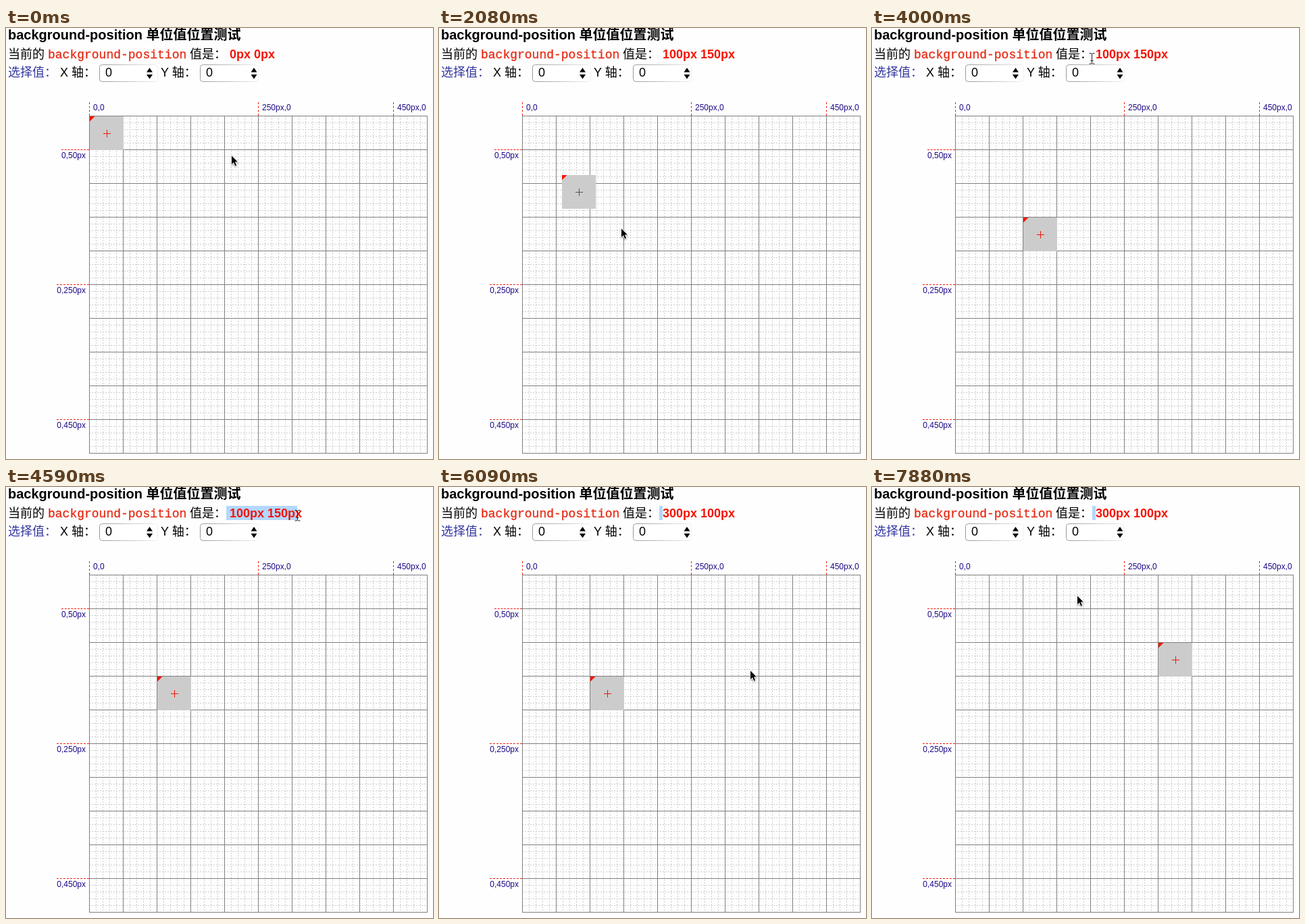
An HTML page that plays this animation: 632 by 639 pixels, repeating every 8 s.

```html
<!DOCTYPE html>
<html lang="zh-CN">
<head>
<meta charset="utf-8">
<style>
html, body { margin: 0; width: 100%; height: 100%; overflow: hidden; background: #fefefe; }
svg { display: block; width: 632px; height: 639px; }
text, .label { font: 18px 'Liberation Sans', 'Noto Sans CJK SC', 'Noto Sans CJK', sans-serif; white-space: pre; }
.title { font-size: 20px; font-weight: bold; }
.code { font-family: 'Liberation Mono', monospace; fill: #e62a14; stroke: #e62a14; stroke-width: .3px; }
.value { font-weight: bold; fill: #f51505; }
#labels { position: absolute; left: 0; top: 0; width: 632px; }
.label { position: absolute; font-size: 12px; line-height: 17px; color: #1c0a86; border: 0 dashed #f51505; }
.top { top: 110px; height: 20px; border-left-width: 1px; padding-left: 5px; }
.left { right: 509px; border-top-width: 1px; padding-right: 5px; }
</style>
</head>
<body>
<svg viewBox="0 0 632 639">
  <defs>
    <linearGradient id="edge"><stop stop-color="#999"/><stop offset="1" stop-color="#f0f0f0"/></linearGradient>
    <g id="select">
      <rect x=".5" y="54.5" width="86" height="25" rx="4" fill="#fff" stroke="url(#edge)"/>
      <text x="9" y="72">0</text>
    </g>
    <path id="spinner" d="M-4.5 65.5h9l-4.5 -6.5zM-4.5 69h9l-4.5 6.5z"/>
  </defs>

  <text class="title" x="3" y="17">background-position 单位值位置测试</text>
  <rect id="selection" x="326" y="28" height="21" fill="#b3d7ff"/>
  <text x="3" y="45">当前的</text>
  <text class="code" x="62" y="45">background-position</text>
  <text x="272" y="45">值是：</text>
  <text class="value" id="value" x="331" y="45"></text>
  <text x="3" y="72" fill="#3336a0">选择值：</text>
  <text x="80" y="72">X 轴：</text>
  <use href="#select" x="138"/>
  <use href="#spinner" x="212.5"/>
  <text x="229" y="72">Y 轴：</text>
  <use href="#select" x="287"/>
  <use href="#spinner" x="367"/>

  <path id="minor" stroke="#ccc" stroke-dasharray="2 2"/>
  <path id="major" stroke="#808080"/>

  <g id="block">
    <rect width="50" height="50" fill="#ccc"/>
    <path d="M0 0H7.5L0 7.5Z" fill="#f51505"/>
    <path id="cross" d="M20 25.5H31M25.5 20V31"/>
  </g>

  <path id="arrow" d="M1 1.5V14L4 11.3L6.2 16.5L8 15.7L5.9 10.6H9.8Z" stroke="#fff" stroke-width="1.6"
    paint-order="stroke" style="filter: drop-shadow(0 1px 1px #0006)"/>
  <path id="beam" d="M-3.5 -7.5H-1L.5 -6.5L2 -7.5H4.5M.5 -6.5V7M-3.5 8H-1L.5 7L2 8H4.5M-1.5 3.5H2.5" fill="none" stroke="#222"/>
</svg>
<div id="labels"></div>
<script>
const $ = id => document.getElementById(id);
const LOOP = 8000;
const TICK = 145;

// Each cursor move leaves from where the previous one ended; bend curves its path.
const dragSelect = { start: 4290, end: 4740, to: [438, 42] };
const moves = [
  { start: 590, end: 1630, to: [269, 296], bend: [92, 250] },
  { start: 2970, end: 4000, to: [325, 45] },
  dragSelect,
  { start: 5190, end: 5790, to: [460, 271], bend: [494, 340] },
  { start: 6240, end: 7130, to: [285, 182] },
  { start: 7280, end: 7880, to: [303, 160] }
];
const clicks = [
  { time: 2080, slide: 2080, to: [100, 150] },
  { time: 6090, slide: 6240, to: [300, 100] }
];

const mix = (a, b, p) => a.map((v, i) => v + (b[i] - v) * p);

// Eased progress that changes only once per tick.
function progress(t, { start, end }) {
  if (t < start) return 0;
  const steps = Math.round((end - start) / TICK);
  const index = Math.floor((t - start) / (end - start) * steps + 0.05);
  const p = Math.min(1, (index + 1) / (steps + 1));
  return 1 - (1 - p) ** 2;
}

function cursorAt(t) {
  let point = [333, 188];
  for (const move of moves) {
    const p = progress(t, move);
    const bend = move.bend || mix(point, move.to, 0.5);
    point = mix(mix(point, bend, p), mix(bend, move.to, p), p);
  }
  return point.map(Math.round);
}

const isSliding = (t, { slide }) => t >= slide && t < slide + TICK;

function blockAt(t) {
  let point = [0, 0];
  for (const click of clicks) {
    if (t >= click.slide) point = mix(point, click.to, isSliding(t, click) ? 0.58 : 1);
  }
  return point.map(Math.round);
}

function gridPath(step) {
  let d = '';
  for (let i = 0; i <= 500; i += step) d += `M${123.5 + i} 130V631M123 ${130.5 + i}H624`;
  return d;
}

function buildPage() {
  $('minor').setAttribute('d', gridPath(10));
  $('major').setAttribute('d', gridPath(50));
  const top = [0, 250, 450].map(x =>
    `<div class="label top" style="left:${123 + x}px">${x ? x + 'px' : 0},0</div>`);
  const left = [50, 250, 450].map(y =>
    `<div class="label left" style="top:${130 + y}px">0,${y}px</div>`);
  $('labels').innerHTML = top.concat(left).join('');
}

function place(id, [x, y]) {
  $(id).setAttribute('transform', `translate(${x} ${y})`);
}

function draw(t) {
  const [x, y] = blockAt(t);
  place('block', [124 + x, 131 + y]);
  $('cross').setAttribute('stroke', clicks.some(click => isSliding(t, click)) ? '#555' : '#f51505');

  const done = clicks.filter(click => t >= click.time);
  const shown = done.length ? done[done.length - 1].to : [0, 0];
  $('value').textContent = shown.map(v => v + 'px').join(' ');
  $('selection').setAttribute('width', done.length < 2 ? 112 * progress(t, dragSelect) : 5);

  const cursor = cursorAt(t);
  const overText = cursor[1] < 75;
  place('arrow', cursor);
  place('beam', cursor);
  $('arrow').style.display = overText ? 'none' : '';
  $('beam').style.display = overText ? '' : 'none';
}

buildPage();
const begin = performance.now();
function tick() {
  draw((performance.now() - begin) % LOOP);
  requestAnimationFrame(tick);
}
tick();
</script>
</body>
</html>
```
